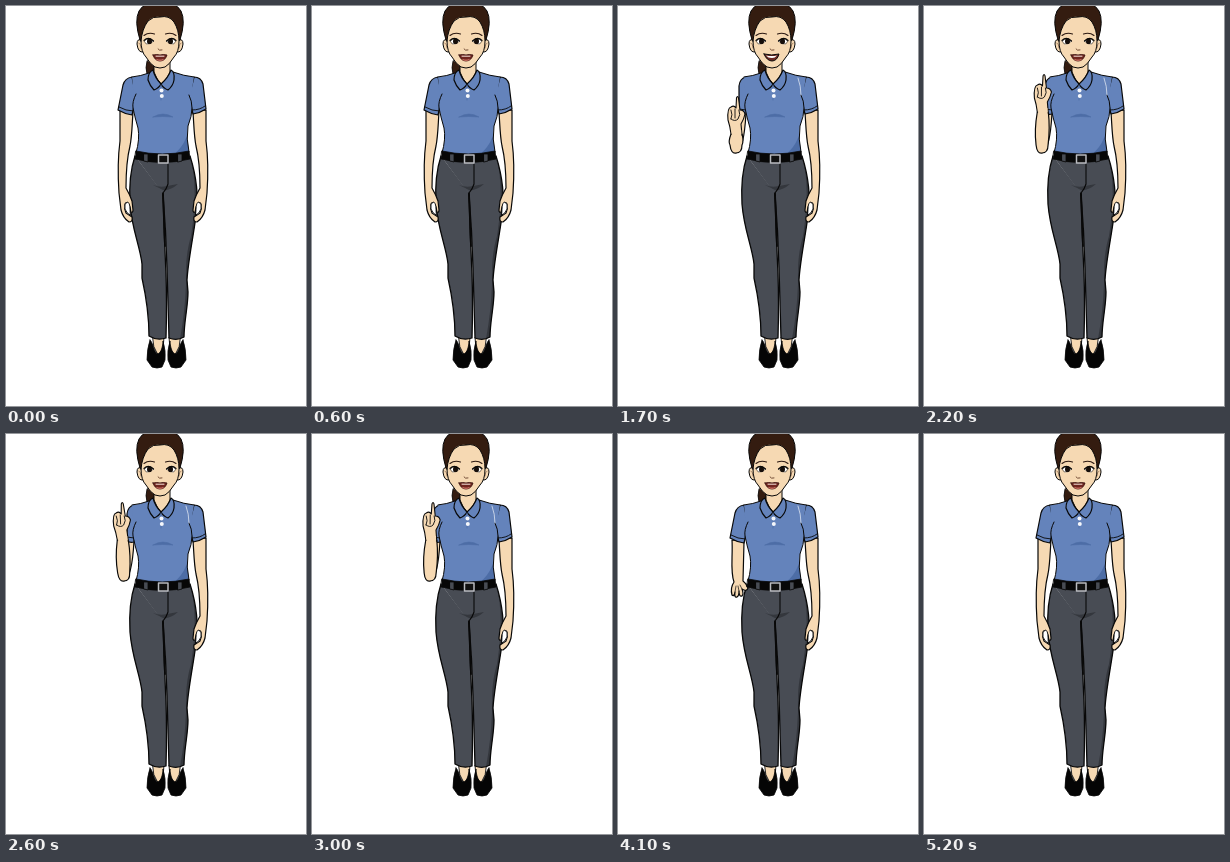
An HTML page with a canvas for the animation above (5300 ms loop, 300x400 px).

```html
<!DOCTYPE html>
<html lang="en">
<head>
<meta charset="utf-8">
<title>Pointing woman</title>
<style>
html, body { margin: 0; width: 100%; height: 100%; overflow: hidden; background: #fff; }
canvas { display: block; width: 300px; height: 400px; }
</style>
</head>
<body>
<canvas id="stage" width="300" height="400"></canvas>
<script>
const ctx = document.getElementById("stage").getContext("2d");
const LOOP = 5300, STEP = 100;
const SKIN = "#f6d9b3", SHIRT = "#6483bb", SHADE = "#4d6da6";
const PANTS = "#484c54", PANTS_SHADE = "#34373d", HAIR = "#341c10", INK = "#080808";
ctx.lineCap = ctx.lineJoin = "round";

function shape(d, fill, width = 1.2, ink = INK) {
  const path = new Path2D(d);
  if (fill) {
    ctx.fillStyle = fill;
    ctx.fill(path);
  }
  if (width) {
    ctx.strokeStyle = ink;
    ctx.lineWidth = width;
    ctx.stroke(path);
  }
}
const line = (d, width = 1, ink = INK) => shape(d, null, width, ink);

function oval(x, y, rx, ry, fill) {
  ctx.beginPath();
  ctx.ellipse(x, y, rx, ry, 0, 0, Math.PI * 2);
  ctx.fillStyle = fill;
  ctx.fill();
}

function transformed(matrix, draw) {
  ctx.save();
  ctx.transform(...matrix);
  draw();
  ctx.restore();
}
const mirrored = (sum, draw) => transformed([-1, 0, 0, 1, sum, 0], draw);

function hangingArm() {
  shape("M187 106 C188 120 188 130 190 140 C193 152 194 168 194 182 Q190 189 188 195 L187 204 Q187 207 189 206 L190 201 Q193 194 195 198 Q196 203 194 207 L188 211 Q187 216 191 216 Q197 212 199 204 L201 187 C202 172 202 150 200 135 V104Z", SKIN);
  shape("M190 203 Q190 196 193 196 Q196 198 195 203 Q193 208 190 209Z", "#fff", 0.9);
}

function shoe() {
  shape("M147 331 H158 L157 343 L152 349 L148 341Z", SKIN, 0.9);
  shape("M144 334 C147 336 148 347 152 348 C155 347 157 340 157 335 Q160 345 159 354 L156 361 Q151 363 146 361 L141 354 Q141 343 144 334Z", "#050505", 0.8);
}

function legs() {
  shoe();
  mirrored(321, shoe);
  shape("M157 186 Q158 220 160 260 L161 330 L163 330 Q161 290 161 262 Q159 220 160 186Z", "#fff", 0);
  shape("M129 150 C125 162 123 180 124 198 C126 224 134 240 136 258 L136 272 C140 290 143 306 143 330 Q151 335 160 332 Q161 296 160 268 Q158 228 157 187Z", PANTS, 0);
  shape("M129 150 L157 188 Q160 225 161 262 Q162 294 163 332 Q171 335 178 331 C178 316 182 300 182 286 L181 274 C182 256 187 232 190 210 C193 190 190 169 184 150Z", PANTS, 0);
  shape("M186 158 C191 185 188 210 185 230 C179 250 180 267 180 278 Q179 306 174 333 L178 331 C178 316 182 300 182 286 L181 274 C182 256 187 232 190 210 Q193 185 186 158Z", PANTS_SHADE, 0);
  line("M129 150 C125 162 123 180 124 198 C126 224 134 240 136 258 L136 272 C140 290 143 306 143 330 Q151 335 160 332 Q161 296 160 268 Q158 228 157 187", 1.3);
  line("M157 188 Q160 225 161 262 Q162 294 163 332 Q171 335 178 331 C178 316 182 300 182 286 L181 274 C182 256 187 232 190 210 C193 190 190 169 184 150", 1.3);
  line("M157 188 Q158 215 159 240", 1.8);
  shape("M147 179 Q154 182 161 180 L172 178 Q164 185 157 184Z", PANTS_SHADE, 0);
  line("M162 158 V178 Q161 182 157 187", 1.1);
}

function belt() {
  shape("M130 145 Q156 151 183 145 L184 153 Q156 160 129 153Z", "#070707", 0.8);
  shape("M138 148 H142 V156 L138 155Z M172 148 H176 V155 L172 156Z", PANTS, 0.8);
  shape("M152.5 149 H162 V157 H152.5Z", "#111", 1.5, "#b9bbc0");
}

function shirt(active, raised) {
  shape("M188 71 Q195 71 197 78 L200 103 Q194 107 187 108 L183 91Z", SHIRT);
  if (raised) {
    shape("M128 71 Q122 72 121 80 V107 Q124 109 128 108 L130 88Z", SHIRT);
    line("M121 103 L128 104", 0.9);
  } else {
    shape("M126 71 Q119 72 117 79 L112 104 Q119 108 126 109 L130 91Z", SHIRT);
    line("M113 101 Q120 105 127 105", 0.9);
  }
  line("M186 104 Q194 104 199 100", 0.9);
  shape("M143 67 Q135 70 126 71 Q128 88 127 101 Q129 112 132 122 Q134 133 130 147 Q155 153 183 146 Q180 133 182 120 Q186 110 186 100 Q185 86 188 71 Q178 70 167 66Z", SHIRT, 0);
  shape("M180 132 Q176 142 168 148 L183 146 L181 130Z", SHADE, 0);
  line("M143 67 Q135 70 126 71 M167 66 Q178 70 188 71");
  line("M130 88 Q126 96 127 102 Q129 112 132 122 Q134 133 130 147 M183 146 Q180 133 182 120 Q186 110 186 102 Q186 95 183 89");
  shape("M147 111 Q157 105 167 111 Q157 110 147 111Z", SHADE, 0.6, SHADE);
  if (active) line("M180 72 Q183 80 183 89", 0.8, "#dce4f0");
}

function collar() {
  shape("M148 56 V66 Q151 74 155 78 Q162 73 164 66 V55Z", SKIN, 1);
  shape("M147 64 Q142 66 142 74 Q144 80 148 84 Q153 82 155 78 Q149 72 147 64Z", SHIRT);
  shape("M165 64 Q169 66 168 74 Q167 80 162 84 Q157 82 155 78 Q162 72 165 64Z", SHIRT);
  line("M155 79 V94", 0.8, SHADE);
  oval(155.5, 84.5, 2, 2, "#f5f7fb");
  oval(155.8, 90, 2, 2, "#f5f7fb");
}

function eye() {
  shape("M-5 0 Q-1 -5 4 0 Q1 4 -3 3Z", "#fff", 0.5);
  oval(0, 0.2, 2.5, 2.9, "#160e0a");
  line("M-5.5 -0.5 Q-1 -5 4 0", 1.2);
  line("M-5.5 -5.5 Q-1 -9 5 -7", 1.1, "#2a1710");
}

function mouth(smiling) {
  if (smiling) {
    shape("M146 48 Q154 50 161 48 Q159 55 154 55 Q149 55 146 48Z", "#6b2923", 1);
    shape("M148 49.5 Q154 50.5 159 49.5 Q157 52 154 52 Q150 52 148 49.5Z", "#fff", 0);
  } else {
    shape("M147 49 Q151 48 154 49 Q157 48 161 49 Q159 55 154 55 Q149 55 147 49Z", "#70251f", 0.9, "#3b1410");
    line("M150 50.2 H158", 1, "#f5e5dc");
    line("M151 53.6 Q154 55 157 53.6", 1.4, "#c46a5e");
  }
}

function ear() {
  shape("M136 34 Q131 32 131 38 Q132 47 137 46Z", SKIN, 1);
  line("M133 37 Q135 38 135 42", 0.6, "#714b35");
}

function head(smiling) {
  ear();
  mirrored(308, ear);
  shape("M134 34 Q128 15 133 5 Q138 -4 154 -5 Q170 -4 175 5 Q180 15 174 34Z", HAIR, 1);
  shape("M135 35 Q136 23 142 15 Q147 10 154 11 Q163 9 168 16 Q173 24 173 35 Q173 46 168 51 Q163 59 159 61 Q154 63 149 61 Q144 58 140 51 Q135 46 135 35Z", SKIN, 1);
  transformed([1, 0, 0, 1, 143.5, 35], eye);
  transformed([-1, 0, 0, 1, 164.5, 35], eye);
  line("M152 43 Q153 45 156 44", 1, "#714b35");
  mouth(smiling);
}

function hipHand() {
  shape("M114 106 C115 122 112 137 116 148 Q112 154 114 161 Q116 163 117 158 Q116 164 119 163 Q121 162 121 157 Q121 163 124 162 Q126 160 124 155 Q129 158 130 154 Q128 149 125 147 L126 108Z", SKIN);
  line("M117 158 L118 152 M121 157 L120 152 M124 155 L122 151", 0.7);
}

function pointingHand() {
  shape("M113 106 Q112 98 110 92 Q109 80 113 79 Q116 77 118 80 L118.5 70 Q119.5 67 120.5 70 L122 82 Q126 82 127 86 Q126 91 123 96 L124 107Z", SKIN, 1.1);
  ctx.fillStyle = SKIN;
  ctx.fillRect(113.8, 102, 9.4, 7);
  line("M113 82 Q115 87 113 91 M117 81 L117 90 M121 82 Q123 87 120 91 Q117 94 113 91", 0.9);
}

// Lift is the share of full forearm height.
function raisedForearm(lift, sway) {
  const drop = (1 - lift) * 40;
  const top = 106 + drop;
  transformed([1, 0, -sway / 78, 1, sway * 147 / 78, 0], () => {
    shape(`M113 ${top} Q110 ${top + 18 * lift} 112 139 Q113 148 118 147 Q124 147 124 139 Q126 ${top + 16 * lift} 124 ${top}Z`, SKIN);
    transformed([1, 0, 0, 1, 0, drop], pointingHand);
  });
}

function armPose(time) {
  if (time < 1500 || time >= 4300) return "down";
  if (time < 1700 || time >= 4100) return "hip";
  if (time < 1900) return time < 1800 ? 0.45 : 0.75;
  if (time >= 3900) return time < 4000 ? 0.75 : 0.45;
  return 1;
}

function isSmiling(time) {
  const talking = time >= 300 && time < 2000 || time >= 2700 && time < 3800;
  return talking && time % 500 >= 200 && time % 500 < 400;
}

function render(time) {
  ctx.fillStyle = "#fff";
  ctx.fillRect(0, 0, 300, 400);
  const pose = armPose(time);
  const lifted = typeof pose === "number";

  shape("M141 55 Q139 62 141 68 L148 66 L149 57Z", HAIR, 0.8);
  if (lifted) shape("M121 104 Q120 122 113 138 L118 147 Q126 144 128 107Z", SKIN);
  legs();
  hangingArm();
  if (pose === "down") mirrored(314, hangingArm);
  if (pose === "hip") hipHand();
  shirt(pose !== "down", lifted);
  belt();
  collar();
  head(isSmiling(time));
  if (lifted) {
    const sway = pose === 1 ? 2.5 * Math.cos((time - 3000) / 700 * Math.PI * 2) - 1 : 0;
    raisedForearm(pose, sway);
  }
}

function tick() {
  const time = performance.now() % LOOP;
  render(Math.floor(time / STEP) * STEP);
  requestAnimationFrame(tick);
}
tick();
</script>
</body>
</html>
```
